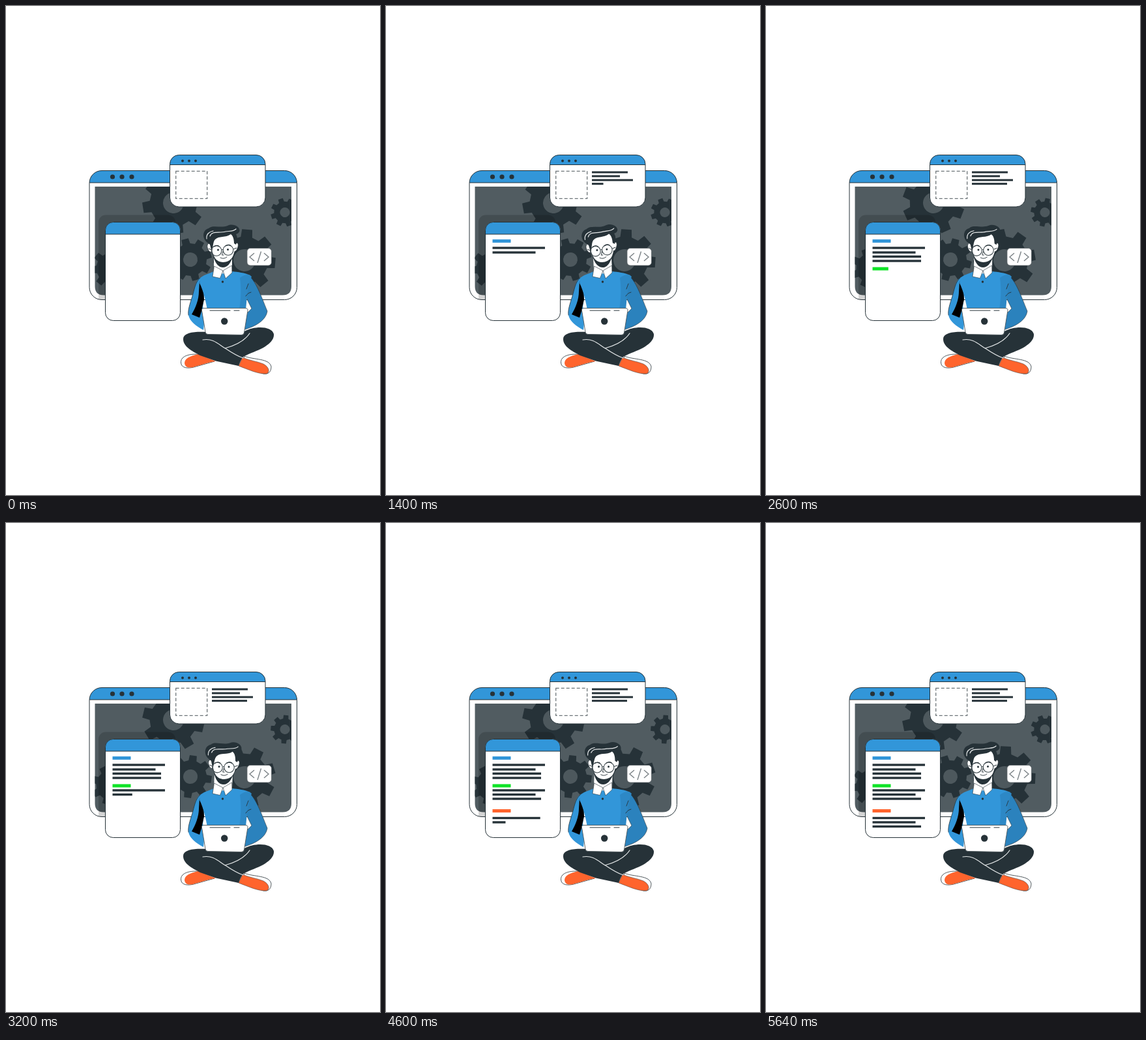
An HTML page that plays this animation: 574 by 750 pixels, repeating every 5680 ms.

```html
<!DOCTYPE html>
<html lang="en">
<head>
<meta charset="utf-8">
<title>Developer at work</title>
<style>
  html, body { margin: 0; width: 100%; height: 100%; overflow: hidden; background: #fff; }
  svg { display: block; width: 574px; height: 750px; }
  .ink { fill: #263238; }
  .blue { fill: #3296d9; }
  .paper { fill: #fff; }
  .edge { fill: none; stroke: #263238; }
  .orange { fill: #ff642d; }
  .line { fill: none; stroke: #263238; stroke-linecap: round; stroke-linejoin: round; }
  .light { fill: none; stroke: #e4e7e8; stroke-width: 1.2; stroke-linecap: round; }
  .shoe { fill: #fff; stroke: #263238; stroke-width: .8; }
</style>
</head>
<body>
<svg viewBox="0 0 574 750">
  <defs>
    <clipPath id="windowClip"><rect x="128" y="252.5" width="318.5" height="198" rx="19"/></clipPath>
    <clipPath id="screenClip"><path d="M136.500 277H438V430Q438 443.500 424.500 443.500H150Q136.500 443.500 136.500 430Z"/></clipPath>
    <clipPath id="popupClip"><rect x="251.5" y="228.5" width="146.5" height="79.5" rx="14"/></clipPath>
    <clipPath id="panelClip"><rect x="152.5" y="331.5" width="115" height="151" rx="12"/></clipPath>
  </defs>

  <!-- main window -->
  <g clip-path="url(#windowClip)">
    <rect class="paper" x="128" y="252" width="319" height="199"/>
    <rect class="blue" x="128" y="252" width="319" height="19"/>
    <path class="edge" d="M128 271H447"/>
    <g clip-path="url(#screenClip)">
      <rect x="136" y="277" width="303" height="167" fill="#515c61"/>
      <g id="gears"></g>
    </g>
    <rect x="142" y="320.5" width="118" height="150" rx="11" opacity=".17"/>
  </g>
  <rect class="edge" x="128" y="252.5" width="318.5" height="198" rx="19"/>
  <g class="ink">
    <circle cx="163.5" cy="262" r="3.6"/><circle cx="178" cy="262" r="3.6"/><circle cx="193" cy="262" r="3.6"/>
  </g>

  <!-- popup -->
  <g clip-path="url(#popupClip)">
    <rect class="paper" x="251" y="228" width="148" height="81"/>
    <rect class="blue" x="251" y="228" width="148" height="15.5"/>
    <path class="edge" d="M251 243.5H398"/>
  </g>
  <rect class="edge" x="251.5" y="228.5" width="146.5" height="79.5" rx="14"/>
  <g class="ink">
    <circle cx="271" cy="237.5" r="2"/><circle cx="281" cy="237.5" r="2"/><circle cx="291" cy="237.5" r="2"/>
  </g>
  <rect x="260.700" y="253.300" width="48" height="42" fill="none" stroke="#6c7478" stroke-width="1.300" stroke-dasharray="5 3"/>

  <!-- side panel -->
  <g clip-path="url(#panelClip)">
    <rect class="paper" x="152" y="331" width="117" height="152"/>
    <rect class="blue" x="152" y="331" width="117" height="19"/>
    <path class="edge" d="M152 350H268"/>
  </g>
  <rect class="edge" x="152.5" y="331.5" width="115" height="151" rx="12"/>
  <g id="bars"></g>

  <!-- code card -->
  <rect x="370" y="371.5" width="37.5" height="26.5" rx="5" fill="#fff" stroke="#5c6468" stroke-width=".8"/>
  <path d="M381 379L374 385L381 391M391.5 376.5L386 394M396 379L403 385L396 391" fill="none" stroke="#7b8286" stroke-width="1.4"/>

  <!-- sweater -->
  <path class="blue" d="M300 416C292 418 290 430 286 445C282 458 279 466 280 474C282 484 292 491 303 497L306 466L302 462L304 446Z"/>
  <path d="M297 422C302 432 304 442 304 450L300 468L297 478L285 473C291 463 296 450 296 438Z"/>
  <path fill="#2b82bd" stroke="#263238" stroke-width=".6" d="M371 412C383 420 392 446 401 468C399 482 384 491 364 497L368 473L377 464L367 444Z"/>
  <path class="blue" d="M298 417C306 411 313 410 319 407H347C356 408 366 409 375 413C370 430 369 446 367 466H309C306 450 303 437 297 425Z"/>
  <path fill="#2d88c6" d="M359 417C366 411 373 411 377 415C370 431 370 448 368 466H358C361 448 361 431 359 417Z"/>
  <path class="line" stroke-width=".9" d="M372 426L369 434M376 439Q371 440 368 445"/>
  <path class="line" stroke-width=".8" d="M298 417C290 424 289 436 286 445C282 458 279 466 280 474"/>

  <!-- head -->
  <g id="head">
    <path class="paper" d="M319 384H347V405L333 411L319 405Z"/>
    <path class="ink" d="M317 378C319 390 324 401 333 401C342 401 347 390 350 378Z"/>
    <path class="paper" stroke="#263238" stroke-width=".8" d="M316 366C310 361 307 367 310 373C312 378 315 378 317 376ZM350 365C356 360 358 366 355 372C353 377 351 377 349 375Z"/>
    <path class="paper" d="M315 353C322 346 344 345 351 352C353 368 351 379 347 386C341 394.500 327 395.500 321 387C316 379 314 367 315 353Z"/>
    <path class="ink" d="M311 364C301 359 300 344 311 341C317 335 330 341 340 337C348 333 359 338 358.500 345C357 349 355 349 353 350C356 355 355 361 353 366L350 364C350 357 348 352 345 350C337 356 327 352 321 358C318 361 318 367 316 378L313 366Z"/>
    <path class="light" d="M308 357C307 350 312 346 318 345M313 353C316 344 327 349 337 346C343 345 349 346 353 342"/>
    <g fill="none" stroke="#3d484d" stroke-width="1.100">
      <circle cx="323" cy="375.500" r="7.800"/><circle cx="341" cy="374.500" r="7.800"/>
      <path d="M331 374Q332.500 373 333.500 374M315 374L311 372M349 373L354 371"/>
    </g>
    <g class="ink"><circle cx="325.500" cy="374" r="1.500"/><circle cx="340.500" cy="373.500" r="1.500"/></g>
    <path class="line" stroke-width="1.200" d="M319 369Q323 366 327 368.500M337 368Q341 365 345 367.500"/>
    <path class="line" stroke-width=".9" d="M333 376L331.500 382H334M329 386Q334 389 339 385"/>
  </g>

  <!-- collar -->
  <path class="paper" stroke="#263238" stroke-width=".6" stroke-linejoin="round" d="M319.500 399L317 415L328.500 417.500L333 406ZM346.500 398L347 409L337 418L333 406Z"/>
  <path class="blue" d="M333 409L330 418H336Z"/>
  <circle class="ink" cx="332.500" cy="423" r="1.700"/>

  <!-- shoes and legs -->
  <path class="shoe" d="M292 534C278 534 268 538 268.500 547C269 556 280 556 288 554L320 545Z"/>
  <path class="orange" d="M295 534C281 537 274 541 274 548C275 555 282 556 290 553C302 550 311 546 322 545Z"/>
  <path class="shoe" d="M366 537C380 543 404 540 407 553C407 562 402 565 395 564L360 551Z"/>
  <path class="orange" stroke="#263238" stroke-width=".5" d="M363 539C374 544 386 545 395 549C403 553 406 561 400 564C388 565 373 558 357 552Z"/>
  <path class="ink" d="M308 500C292 499 272 500 272 511C272 522 285 529 298 536L322 544.500L357 552C359 546 361 542 364 538C375 532 386 529 395 524C405 518 412 511 411 503C408 491 382 490 366 499Z"/>
  <path class="light" stroke-width="1" d="M302 512C319 509 327 520 338 526C347 532 355 537 364 540M374 502C366 514 351 521 336 525"/>

  <!-- laptop -->
  <path fill="#fff" stroke="#4b565b" stroke-width=".9" d="M304 463.500H367Q371.500 463.500 371 467L365.500 501Q365 504.500 361 504.500L310 503.500Q306.500 503.500 306 500L300.500 467Q300 463.500 304 463.500Z"/>
  <path class="line" stroke-width="1" d="M313 467H344M350 467H358"/>
  <circle class="ink" cx="335.200" cy="483.500" r="5.200"/>
</svg>
<script>
  const LOOP = 5680, STEP = 40;
  const INK = "#263238", BLUE = "#3296d9", GREEN = "#10e428", ORANGE = "#ff642d";

  // x, y, outer radius, hole radius, start angle
  const GEARS = [
    [257, 302, 48, 16, 36],
    [283, 389, 33, 11, 30],
    [366, 390, 48, 17, 5],
    [428, 316.5, 22, 7.5, 27],
    [162, 402, 31, 10, 40]
  ];

  // x, y centre, width, height, colour, start, end
  const BARS = [
    [316, 255, 55, 3, INK, 20, 440],
    [316, 261, 43, 3, INK, 450, 890],
    [316, 267, 63, 3, INK, 870, 1280],
    [316, 272.7, 54, 3, INK, 1270, 1670],
    [163.5, 360.5, 28, 5, BLUE, 0, 480],
    [163.5, 371, 80.5, 3.4, INK, 550, 1050],
    [163.5, 378, 66, 3.4, INK, 940, 1380],
    [163.5, 384.3, 74.5, 3.4, INK, 1560, 2040],
    [163.5, 391, 74.5, 3.4, INK, 1920, 2440],
    [163.5, 403, 28, 5, GREEN, 2340, 2640],
    [163.5, 410, 80.5, 3.4, INK, 2600, 3060],
    [163.5, 416.5, 66, 3.4, INK, 2980, 3460],
    [163.5, 423, 74.5, 3.4, INK, 3400, 3860],
    [163.5, 441.5, 28, 5, ORANGE, 3820, 4200],
    [163.5, 452.5, 80.5, 3.4, INK, 4200, 4640],
    [163.5, 459, 66, 3.4, INK, 4470, 4900],
    [163.5, 465.5, 74.5, 3.4, INK, 4900, 5400]
  ];

  const byId = id => document.getElementById(id);

  function add(parent, tag, attrs) {
    const node = document.createElementNS("http://www.w3.org/2000/svg", tag);
    for (const key in attrs) node.setAttribute(key, attrs[key]);
    return parent.appendChild(node);
  }

  function gearPath(radius) {
    const corners = [[-14, 0.76], [-9.5, 1], [9.5, 1], [14, 0.76]];
    const points = [];
    for (let tooth = 0; tooth < 8; tooth++) {
      for (const [offset, scale] of corners) {
        const a = (tooth * 45 + offset) * Math.PI / 180;
        points.push((Math.cos(a) * radius * scale).toFixed(2) + " " + (Math.sin(a) * radius * scale).toFixed(2));
      }
    }
    return "M" + points.join("L") + "Z";
  }

  const gears = GEARS.map(([x, y, radius, hole, start]) => {
    const node = add(byId("gears"), "g", {});
    add(node, "path", { d: gearPath(radius), fill: INK });
    add(node, "circle", { r: hole, fill: "#4d585d" });
    return { node, x, y, start };
  });

  const bars = BARS.map(([x, y, width, height, fill, start, end]) => ({
    node: add(byId("bars"), "rect", { x, y: y - height / 2, width: 0, height, fill }),
    width, start, end
  }));

  // Sway from -1 (left) to 1 (right)
  function sway(t) {
    const left = 1400, right = 3400;
    if (t < left) return -Math.sin(t / left * Math.PI / 2);
    if (t < right) return -Math.cos((t - left) / (right - left) * Math.PI);
    return Math.cos((t - right) / (LOOP - right) * Math.PI / 2);
  }

  function draw() {
    const t = Math.floor(performance.now() % LOOP / STEP) * STEP;
    for (const { node, x, y, start } of gears) {
      node.setAttribute("transform", `translate(${x} ${y}) rotate(${start + t / LOOP * 360})`);
    }
    for (const { node, width, start, end } of bars) {
      const p = Math.min(1, Math.max(0, (t - start) / (end - start)));
      node.setAttribute("width", width * p);
    }
    byId("head").setAttribute("transform", `rotate(${sway(t) * 3} 333 405)`);
    requestAnimationFrame(draw);
  }
  draw();
</script>
</body>
</html>
```
